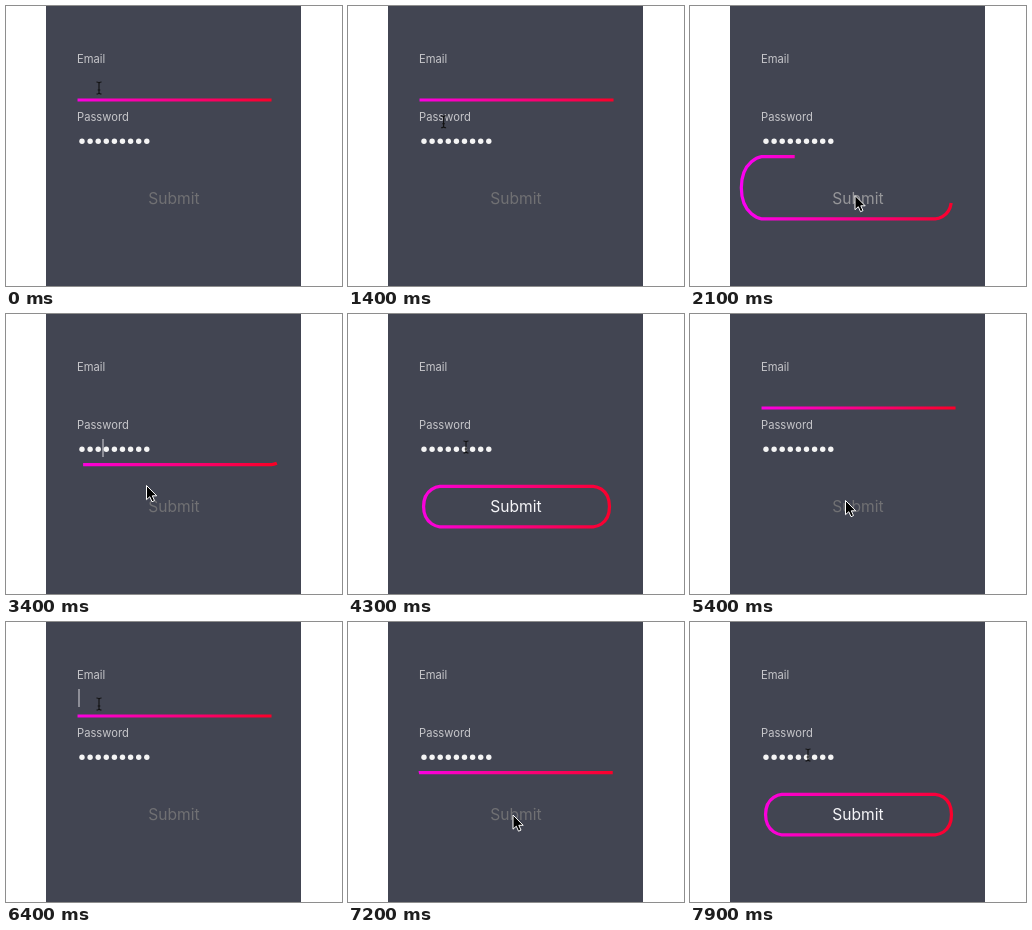
An HTML page for the animation above (8 s loop, 336x280 px).

```html
<!DOCTYPE html>
<html lang="en">
<head>
<meta charset="utf-8">
<title>Login form</title>
<style>
  html, body { margin: 0; width: 100%; height: 100%; overflow: hidden; background: #fff; }
  svg { display: block; width: 336px; height: 280px; }
  text { font-family: Inter, Roboto, "Liberation Sans", sans-serif; }
  .label { font-size: 11.2px; fill: #c6c6ca; }
  .submit { font-size: 15.6px; text-anchor: middle; }
</style>
</head>
<body>
<svg viewBox="0 0 336 280">
  <defs>
    <linearGradient id="glow" x1="13" y1="0" x2="307" y2="0" gradientUnits="userSpaceOnUse">
      <stop offset="0" stop-color="#fa00f5"/>
      <stop offset="1" stop-color="#fa0014"/>
    </linearGradient>
  </defs>
  <rect x="40" width="255" height="280" fill="#424552"/>
  <text class="label" x="71" y="56.5">Email</text>
  <text class="label" x="71" y="115">Password</text>
  <g id="dots" fill="#f4f4f4"></g>
  <text class="submit" id="submit" x="168" y="198">Submit</text>
  <path id="line" transform="translate(39.2 -3) scale(.8083)" fill="none" stroke="url(#glow)" stroke-width="4"
    d="M40 120H280c0 0 25 .8 25 35s-25 35-25 35H40c0 0-25 4-25 38.5s25 38.5 25 38.5h215c0 0 20-1 20-25s-20-25-20-25H65c0 0-20 1.7-20 25s20 25 20 25h168.6"/>
  <rect id="caret" width="1" height="18" fill="#d8d8dc"/>
  <path id="arrow" d="M0 0V14.2L3.3 11.2L5.5 16.2L8 15.1L5.8 10.3H10.2Z" fill="#000" stroke="#fff" stroke-width="1"/>
  <path id="beam" d="M-2.5-6Q0-6 0-4.5Q0-6 2.5-6M0-4.5V4.5M-2.5 6Q0 6 0 4.5Q0 6 2.5 6M-1.3 2H1.3" fill="none" stroke="#111" stroke-width="1.1"/>
</svg>
<script>
  const LOOP = 8000, STEP = 100, SLIDE = 437, FADE = 375, BLINK = 310;
  const $ = id => document.getElementById(id);

  // Dash start and dash length for each focused field
  const dash = { email: [0, 240], password: [336, 240], submit: [730, 530] };

  // When each field takes focus within a pass, and its caret position
  const focus = [
    { at: 0, field: 'email', caret: [72.5, 67] },
    { at: 434, field: 'password', caret: [96.5, 125] },
    { at: 930, field: 'submit' },
    { at: 1610, field: 'password', caret: [120.5, 125] },
    { at: 2150, field: 'email', caret: [72.5, 67] },
    { at: 2705, field: 'submit' }
  ];

  // Pointer stops: time, x, y
  const stops = [
    [0, 93, 82], [150, 93, 82], [400, 97, 134], [480, 97, 134],
    [700, 140.5, 171.5], [900, 165, 193], [1000, 165, 189.5], [1150, 165, 189.5],
    [1550, 118, 133], [1700, 118, 133], [2100, 93, 82], [2250, 93, 82],
    [2650, 155.5, 186.5], [3600, 155.5, 186.5]
  ];

  const lerp = (a, b, p) => a + (b - a) * p;
  const clamp = p => Math.min(1, Math.max(0, p));
  const outQuart = p => 1 - (1 - p) ** 4;
  const smooth = p => p * p * (3 - 2 * p);
  const move = (el, x, y) => el.setAttribute('transform', `translate(${x} ${y})`);

  for (let i = 0; i < 9; i++) {
    const dot = document.createElementNS('http://www.w3.org/2000/svg', 'circle');
    dot.setAttribute('cx', 76 + i * 8.1);
    dot.setAttribute('cy', 135.3);
    dot.setAttribute('r', 2.7);
    $('dots').append(dot);
  }

  function drawPointer(phase) {
    const i = Math.max(1, stops.findIndex(s => s[0] >= phase));
    const [t0, x0, y0] = stops[i - 1], [t1, x1, y1] = stops[i];
    const p = smooth(clamp((phase - t0) / (t1 - t0)));
    const x = lerp(x0, x1, p), y = lerp(y0, y1, p);
    const typing = y < 152;
    move($('arrow'), x, y);
    move($('beam'), x, y);
    $('arrow').style.display = typing ? 'none' : '';
    $('beam').style.display = typing ? '' : 'none';
  }

  function draw(time) {
    // The first pass waits in the email field; later passes cut back to it
    const begin = time < 2700 ? 1100 : time < 6300 ? 2700 : 6300;
    const phase = Math.max(0, time - begin);
    const n = focus.filter(f => f.at <= phase).length - 1;
    const now = focus[n], last = focus[Math.max(0, n - 1)];
    const age = phase - now.at;

    const p = outQuart(clamp(age / SLIDE));
    const [from, to] = [dash[last.field], dash[now.field]];
    $('line').style.strokeDashoffset = -lerp(from[0], to[0], p);
    $('line').style.strokeDasharray = `${lerp(from[1], to[1], p)} 1386`;

    const lit = f => f.field === 'submit' ? 1 : 0;
    const fade = Math.sin(clamp(age / FADE) * Math.PI / 2);
    const grey = Math.round(lerp(112, 245, lerp(lit(last), lit(now), fade)));
    $('submit').style.fill = `rgb(${grey},${grey},${grey + 3})`;

    const blinkAge = n === 0 && begin === 1100 ? time + 350 : age;
    const shown = now.caret && blinkAge % (2 * BLINK) < BLINK;
    $('caret').style.display = shown ? '' : 'none';
    if (now.caret) move($('caret'), ...now.caret);

    drawPointer(phase);
  }

  const start = performance.now();
  function tick() {
    const time = (performance.now() - start) % LOOP;
    draw(Math.floor(time / STEP) * STEP);
    requestAnimationFrame(tick);
  }
  tick();
</script>
</body>
</html>
```
